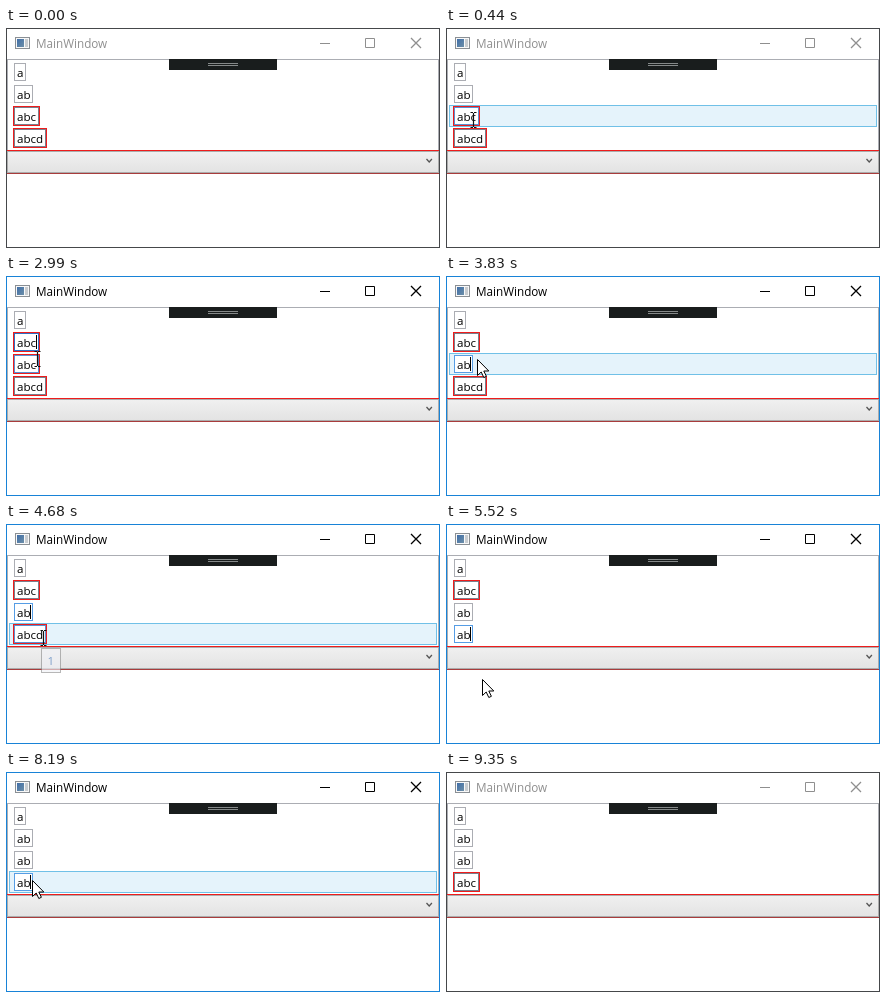
Animation of 434 by 220 pixels, one loop 9.43 s. Source, as an HTML page:

```html
<!DOCTYPE html>
<html lang="en">
<head>
<meta charset="utf-8">
<title>MainWindow</title>
<style>
  html, body { margin: 0; width: 100%; height: 100%; overflow: hidden; background: #fff; }
  svg { display: block; width: 434px; height: 220px; }
  text { font-family: "Open Sans", "Noto Sans", sans-serif; font-size: 11.6px; fill: #000; }
  .title { font-size: 11.7px; }
  .glyphs { fill: none; stroke: #000; }
  .frame { fill: none; stroke: #1883d7; }
  .idle .title { fill: #8f8f8f; }
  .idle .glyphs { stroke: #8f8f8f; }
  .idle .frame { stroke: #45474a; }
  .red { fill: none; stroke: #ee1c1c; }
  .combo { fill: url(#plain); stroke: #acacac; }
  .combo.hot { fill: url(#lit); stroke: #7eb4ea; }
</style>
</head>
<body>
<svg id="win" class="idle" viewBox="0 0 434 220">
  <defs>
    <linearGradient id="plain" x2="0" y2="1">
      <stop stop-color="#f0f0f0"/><stop offset="1" stop-color="#e3e3e3"/>
    </linearGradient>
    <linearGradient id="lit" x2="0" y2="1">
      <stop stop-color="#ecf4fc"/><stop offset="1" stop-color="#dcecfc"/>
    </linearGradient>
    <linearGradient id="pic" x2="1" y2="1">
      <stop stop-color="#3f6ea8"/><stop offset="1" stop-color="#6d8fa8"/>
    </linearGradient>
  </defs>
  <rect width="434" height="220" fill="#fff"/>

  <rect x="9.5" y="9.5" width="14" height="11" fill="#f8f8f8" stroke="#8a8f94"/>
  <rect x="11" y="11" width="7" height="8" fill="url(#pic)"/>
  <rect x="19" y="11" width="3" height="8" fill="#c8ccd0"/>
  <text class="title" x="30" y="20">MainWindow</text>
  <g class="glyphs">
    <path d="M314 15.5h10M359.5 10.5h9v9h-9z"/>
    <path d="M405 10l10 10M415 10l-10 10" stroke-width="1.3"/>
  </g>

  <rect x="1.5" y="31.5" width="431" height="91" fill="#fff" stroke="#abadb3"/>
  <rect id="hover" x="3.5" width="427" height="21" fill="#e5f3fb" stroke="#70c0e7"/>
  <g id="rows"></g>

  <rect id="combo" class="combo" x="1.5" y="123.5" width="431" height="21"/>
  <path class="red" d="M1 122.5h432"/>
  <path d="M1 145.5h432" stroke="#a83c3c"/>
  <path d="M420.5 131l2.7 3 2.7-3" fill="none" stroke="#555" stroke-width="1.3"/>

  <rect x="163" y="31" width="108" height="11" fill="#191d1d"/>
  <path d="M202 35.5h30M202 37.5h30" stroke="#858989"/>

  <rect class="frame" x=".5" y=".5" width="433" height="219"/>

  <g id="tip">
    <rect x=".5" y=".5" width="19" height="24" fill="#f1f2f7" stroke="#8a8a8a"/>
    <text x="6.5" y="17" style="fill:#3f73b8">1</text>
  </g>
  <path id="arrow" d="M.5.5v16l3.7-3.5 2.6 5.5 2.6-1.2-2.6-5.3h5z" fill="#fff" stroke="#000"/>
  <path id="beam" d="M-3 -7.5h2.5M.5 -7.5h2.5M0 -7V7M-3 7.5h2.5M.5 7.5h2.5" fill="none" stroke="#111" stroke-width="1.2"/>
</svg>
<script>
const LOOP = 9430, BLINK = 500, STEP = 76.7, PRESS = 80;
const ROW = 22, LIST_TOP = 33, BOX_H = 18;
const $ = id => document.getElementById(id);
const set = (el, attrs) => { for (const k in attrs) el.setAttribute(k, attrs[k]); };
const show = (el, on) => set(el, { visibility: on ? "visible" : "hidden" });
const clamp = v => Math.min(1, Math.max(0, v));

const initial = ["a", "ab", "abc", "abcd"];

// Clicks and key presses; a new row means a click
const actions = [
  { time: 670, row: 1, text: "ab" }, { time: 1610, row: 1, text: "abc" },
  { time: 3070, row: 2, text: "abc" }, { time: 3680, row: 2, text: "ab" },
  { time: 4910, row: 3, text: "abcd" }, { time: 5140, row: 3, text: "abc" },
  { time: 5520, row: 3, text: "ab" }, { time: 6460, row: 1, text: "abc" },
  { time: 7310, row: 1, text: "ab" }, { time: 7710, row: 3, text: "ab" },
  { time: 8820, row: 3, text: "abc" }
];
const clicks = actions.filter((a, i) => !i || a.row !== actions[i - 1].row);
const BLUR = 9350;

// Pointer moves: start, end, x, y
const moves = [
  [70, 440, 22, 66], [750, 1360, 91, 73], [2140, 2300, 65, 79],
  [2530, 2760, 35, 80], [2990, 2990, 31, 83], [3910, 3990, 45, 113],
  [4140, 4220, 39, 114], [4450, 4530, 37, 114], [5060, 5290, 36, 155],
  [5920, 6150, 27, 75], [6460, 6460, 27, 67], [6690, 6690, 38, 73],
  [6770, 6840, 96, 119], [7390, 7540, 25, 110], [7950, 8020, 26, 108],
  [8260, 8740, 40, 222]
];

// The pointer is sampled once per STEP while it moves
function pointer(t) {
  let x = 50, y = 222, rest = 0;
  for (const [start, end, tx, ty] of moves) {
    if (t < start) break;
    const total = Math.round((end - start) / STEP) + 1;
    const k = clamp((Math.floor((t - start + 8) / STEP) + 1) / total);
    x += (tx - x) * k;
    y += (ty - y) * k;
    rest = t - end;
  }
  return { x: Math.round(x), y: Math.round(y), rest };
}

function make(tag, parent, attrs) {
  const el = document.createElementNS("http://www.w3.org/2000/svg", tag);
  set(el, attrs);
  return parent.appendChild(el);
}

const boxWidth = s => Math.round(6.6 * s.length + 5.6);

const rows = initial.map((text, i) => {
  const y = LIST_TOP + 2 + ROW * i, g = $("rows");
  return {
    y,
    red: make("rect", g, { class: "red", x: 7.5, y: y - .5, height: BOX_H + 1 }),
    box: make("rect", g, { x: 8.5, y: y + .5, height: BOX_H - 1, fill: "#fff" }),
    label: make("text", g, { x: 11, y: y + 14 }),
    caret: make("rect", g, { y: y + 2, width: 1, height: 14 })
  };
});

function edge(bad, focused, hot) {
  if (focused) return bad ? "#2f6fc4" : "#569de5";
  if (hot) return bad ? "#5a8fd0" : "#7eb4ea";
  return bad ? "#7a7f8c" : "#abadb3";
}

function draw(t) {
  const { x, y, rest } = pointer(t);
  const done = actions.filter(a => a.time <= t), last = done[done.length - 1];
  const active = last && t < BLUR;
  const texts = [...initial];
  for (const a of done) texts[a.row] = a.text;
  let inBox = false, tip = 0;

  rows.forEach((r, i) => {
    const w = boxWidth(texts[i]), bad = texts[i].length > 2;
    const focused = active && last.row === i;
    const hot = x >= 8 && x < 7 + w && y >= r.y && y < r.y + BOX_H;
    inBox = inBox || hot;
    if (hot && bad && !focused) tip = clamp((rest - 60) / 150);
    r.label.textContent = texts[i];
    set(r.red, { width: w + 1 });
    show(r.red, bad);
    set(r.box, { width: w - 1, stroke: edge(bad, focused, hot) });
    set(r.caret, { x: 5 + w });
    show(r.caret, focused && Math.floor((t - last.time) / BLINK) % 2 === 0);
  });

  const over = Math.floor((y - LIST_TOP) / ROW);
  const pressed = clicks.some(c => t >= c.time - PRESS && t < c.time);
  set($("hover"), { y: LIST_TOP + .5 + ROW * over });
  show($("hover"), over >= 0 && over < rows.length && !pressed);
  $("combo").classList.toggle("hot", y >= 123 && y < 146);
  $("win").classList.toggle("idle", !active);
  set($("tip"), { transform: `translate(${x - 2} ${y + 10})`, opacity: tip });
  set($("arrow"), { transform: `translate(${x} ${y})` });
  set($("beam"), { transform: `translate(${x + .5} ${y})` });
  show($("arrow"), !inBox);
  show($("beam"), inBox);
}

const t0 = performance.now();
function tick() {
  draw((performance.now() - t0) % LOOP);
  requestAnimationFrame(tick);
}
tick();
</script>
</body>
</html>
```
